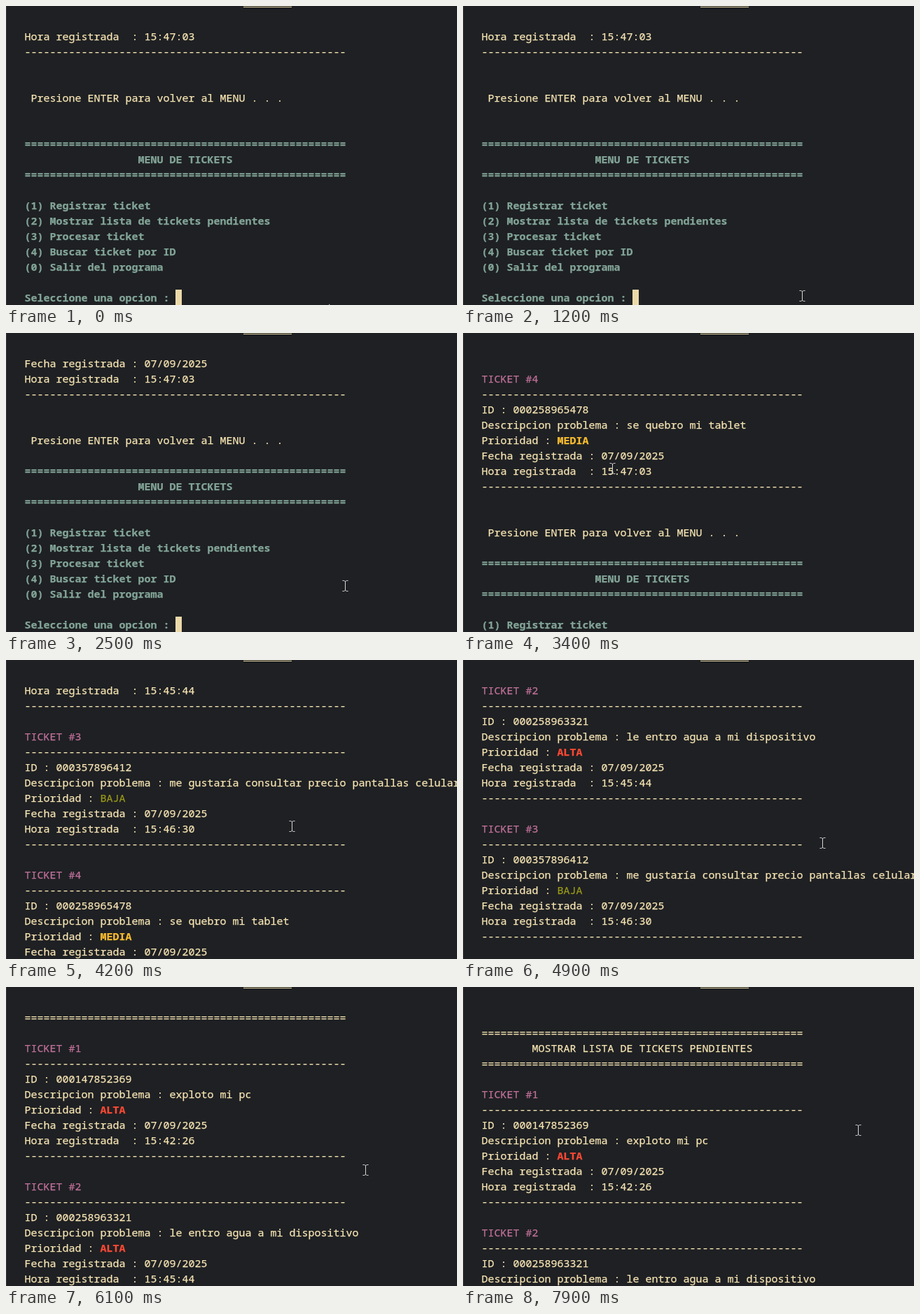
An HTML page that plays this animation: 644 px wide and 428 px high, repeating every 8000 ms.

```html
<!DOCTYPE html>
<html lang="es">
<head>
<meta charset="utf-8">
<title>Menu de tickets</title>
<style>
  html, body { margin: 0; width: 100%; height: 100%; overflow: hidden; background: #1e2023; }
  #stage { position: relative; width: 644px; height: 428px; overflow: hidden; background: #1e2023; }
  #edge { position: absolute; left: 0; top: 0; width: 1px; height: 428px; background: #36343a; }
  #tab { position: absolute; left: 339px; top: 1px; width: 69px; height: 1px; background: #e6d5a4; }
  #term { position: absolute; left: 26px; top: 32px; width: 618px; height: 396px; overflow: hidden; }
  #page { padding-left: .5px; }
  pre {
    margin: 0; white-space: pre; color: #f8e5b4;
    font: 15px/22px "Noto Sans Mono", "DejaVu Sans Mono", monospace;
    -webkit-text-stroke: .25px currentColor;
  }
  #menu { color: #83a598; font-weight: 700; }
  .ticket { color: #c0709a; }
  .alta { color: #fb4934; font-weight: 700; }
  .media { color: #fabd2f; font-weight: 700; }
  .baja { color: #98971a; }
  #caret { position: absolute; left: 0; top: 0; width: 9px; height: 22px; background: #ebd9a9; }
  svg { position: absolute; left: 0; top: 0; overflow: visible; }
</style>
</head>
<body>
<div id="stage">
  <div id="edge"></div>
  <div id="tab"></div>
  <div id="term">
    <div id="page"><pre id="list"></pre><pre id="menu"></pre></div>
    <div id="caret"></div>
  </div>
  <svg id="beam" width="1" height="1">
    <path d="M-3.5-7.5H-1.5L.5-6.5L2.5-7.5H4.5M.5-6.5V6.5M-3.5 7.5H-1.5L.5 6.5L2.5 7.5H4.5" fill="none" stroke="#d6d6d6"/>
  </svg>
  <svg id="arrow" width="1" height="1">
    <path d="M0 0V14L3.5 11L6 16L8 15L5.7 10H10Z" fill="#fff" stroke="#111" stroke-width=".5"/>
  </svg>
</div>
<script>
const LOOP = 8000, ROW = 22, COL = 9;
const REDRAW = 1400, PROMPT = 2200;          // menu is reprinted, then asks again
const WHEEL = 2950, NOTCH = 540, STEP = 17 / 3; // wheel start, pace, rows per notch
const GLIDE = 500;

const $ = id => document.getElementById(id);
const rule = c => c.repeat(51);
const mark = (cls, text) => `<span class="${cls}">${text}</span>`;

const tickets = [
  ["000147852369", "exploto mi pc", "ALTA", "15:42:26"],
  ["000258963321", "le entro agua a mi dispositivo", "ALTA", "15:45:44"],
  ["000357896412", "me gustaría consultar precio pantallas celulares", "BAJA", "15:46:30"],
  ["000258965478", "se quebro mi tablet", "MEDIA", "15:47:03"],
];

const ticketLines = ([id, problem, level, hour], i) => [
  mark("ticket", `TICKET #${i + 1}`),
  rule("-"),
  `ID : ${id}`,
  `Descripcion problema : ${problem}`,
  `Prioridad : ${mark(level.toLowerCase(), level)}`,
  "Fecha registrada : 07/09/2025",
  `Hora registrada  : ${hour}`,
  rule("-"),
  "",
];

// The first line is blank, so row -1 is the top of the page.
$("list").innerHTML = [
  " ",
  rule("="),
  " ".repeat(8) + "MOSTRAR LISTA DE TICKETS PENDIENTES",
  rule("="),
  "",
  ...tickets.flatMap(ticketLines),
  "",
  " Presione ENTER para volver al MENU . . .",
  " ",
].join("\n");

$("menu").textContent = [
  rule("="),
  " ".repeat(18) + "MENU DE TICKETS",
  rule("="),
  "",
  "(1) Registrar ticket",
  "(2) Mostrar lista de tickets pendientes",
  "(3) Procesar ticket",
  "(4) Buscar ticket por ID",
  "(0) Salir del programa",
  "",
  "Seleccione una opcion : ",
].join("\n");

// Pointer stops: arrival time and place.
const stops = [
  { at: 0, x: 461, y: 426 },
  { at: 800, x: 484, y: 415 },
  { at: 2300, x: 484, y: 362 },
  { at: 3200, x: 213, y: 194 },
  { at: 4400, x: 513, y: 262 },
  { at: 6700, x: 564, y: 205 },
];

const clamp01 = k => Math.min(1, Math.max(0, k));
const ease = k => k * k * (3 - 2 * k);

// First visible row of the page.
function rowAt(t) {
  if (t < REDRAW) return 37;
  if (t < PROMPT) return 35;
  const notches = Math.max(0, Math.floor((t - WHEEL) / NOTCH) + 1);
  return Math.max(-1, Math.round(36 - notches * STEP));
}

function pointAt(t) {
  let { x, y } = stops[0];
  for (const s of stops.slice(1)) {
    const k = ease(clamp01((t - s.at) / GLIDE + 1));
    x += (s.x - x) * k;
    y += (s.y - y) * k;
  }
  return [Math.round(x), Math.round(y)];
}

const move = (el, x, y) => { el.style.transform = `translate(${x}px, ${y}px)`; };

function draw(t) {
  const row = rowAt(t);
  const gap = t < REDRAW ? 1 : 0;
  const parked = t >= REDRAW && t < PROMPT;
  $("menu").style.paddingTop = gap * ROW + "px";
  move($("page"), 0, -(row + 1) * ROW);
  move($("caret"), parked ? 0 : 24 * COL, (parked ? 17 : 53 + gap - row) * ROW);

  const [x, y] = pointAt(t);
  const isArrow = t < stops[1].at - GLIDE;
  $("arrow").style.display = isArrow ? "" : "none";
  $("beam").style.display = isArrow ? "none" : "";
  move($(isArrow ? "arrow" : "beam"), x, y);
}

const start = performance.now();
function tick() {
  draw((performance.now() - start) % LOOP);
  requestAnimationFrame(tick);
}
tick();
</script>
</body>
</html>
```
